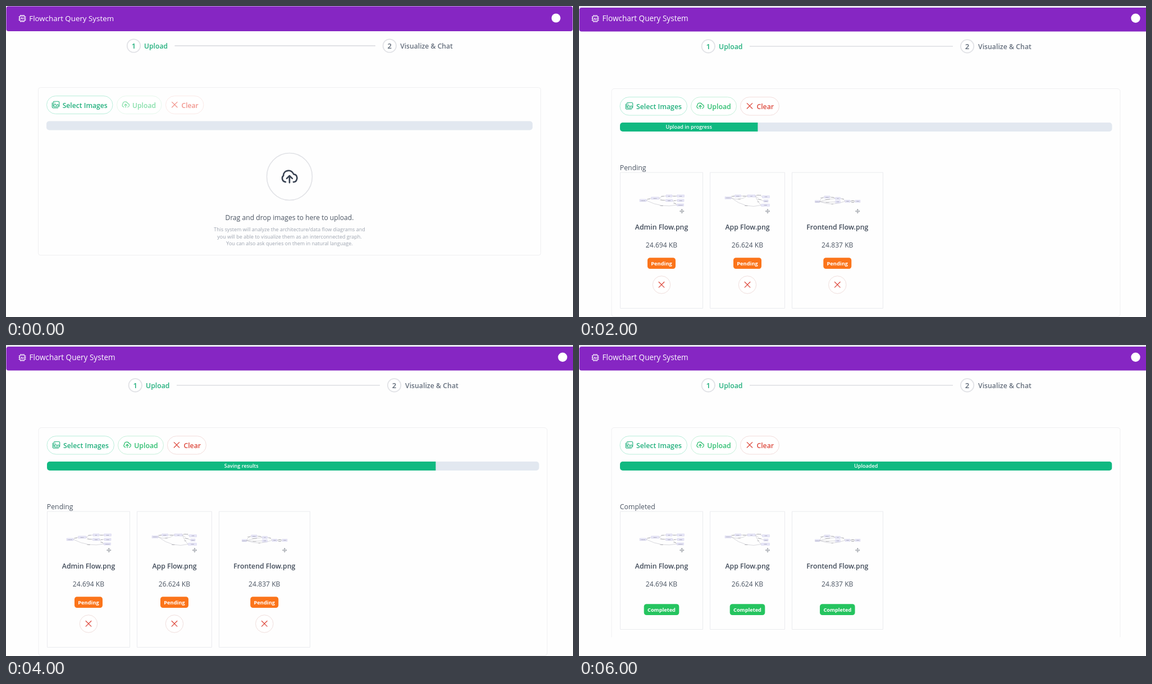
Animation, 1010 px wide and 555 px high, one loop 7 s. Source, as an HTML page with a canvas:

```html
<!DOCTYPE html>
<html lang="en">
<head>
<meta charset="utf-8">
<title>Flowchart Query System</title>
<style>
  html, body { margin: 0; width: 100%; height: 100%; overflow: hidden; background: #fefefe; }
  canvas, svg { position: absolute; left: 0; top: 0; width: 1010px; height: 555px; }
  text { font-family: "Open Sans", "Noto Sans", sans-serif; white-space: pre; }
</style>
</head>
<body>
<canvas id="shapes"></canvas>
<svg id="labels" viewBox="0 0 1010 555"></svg>
<script>
const W = 1010, H = 555, STEP = 1000;
const canvas = document.getElementById('shapes');
const labels = document.getElementById('labels');
const ctx = canvas.getContext('2d');
const dpr = window.devicePixelRatio || 1;
canvas.width = W * dpr;
canvas.height = H * dpr;

const GREEN = '#10b981', RED = '#dd4a3e', SLATE = '#4b5563', RULE = '#e1e2e6';

// Upload stages after the empty start screen: filled share and caption
const stages = [
  [0.25, 'Image(s) ready for upload'],
  [0.28, 'Upload in progress'],
  [0.53, 'Analyzing image(s)'],
  [0.79, 'Saving results'],
  [0.933, 'Merging results from all images'],
  [1, 'Uploaded']
];

// Nodes: x, y, width. Edges: from, to, bend.
const cards = [
  { left: 73.5, right: 220.5, mid: 147, name: 'Admin Flow.png', size: '24.694 KB', grip: 183.3,
    nodes: [[114, 347, 12], [135.5, 343, 14], [160.5, 339, 11], [181, 339, 13],
            [160.5, 347, 12], [181, 347, 12], [180.5, 355, 12]],
    edges: [[0, 1, -2], [1, 2, -3], [1, 4, 3], [2, 3, 0], [4, 5, 0], [4, 6, 2], [0, 6, 10]] },
  { left: 233.5, right: 366.5, mid: 300, name: 'App Flow.png', size: '26.624 KB', grip: 336,
    nodes: [[265.5, 342.5, 11], [283, 339, 11], [307, 339, 14], [333, 340.5, 13],
            [333, 348, 8], [332, 355.5, 15]],
    edges: [[0, 1, -3], [1, 2, 0], [2, 3, -4], [2, 4, 3], [2, 5, 4], [0, 2, 8], [0, 5, 14]] },
  { left: 379.5, right: 541.5, mid: 460.3, name: 'Frontend Flow.png', size: '24.837 KB', grip: 496.3,
    nodes: [[424.5, 349, 8], [442, 341, 10], [461, 343.5, 9], [461, 349.5, 9],
            [478.5, 348.5, 9], [496.5, 348.5, 9]],
    edges: [[0, 1, -5], [1, 2, -2], [0, 2, -2], [0, 3, 2], [0, 4, 9], [2, 4, -4],
            [4, 5, -3], [4, 5, 3]] }
];
const words = ['login', 'view', 'submit', 'open', 'list', 'edit'];

function box(x1, y1, x2, y2, r, fill, stroke, width = 1) {
  ctx.beginPath();
  ctx.roundRect(x1, y1, x2 - x1, y2 - y1, r);
  if (fill) { ctx.fillStyle = fill; ctx.fill(); }
  if (stroke) { ctx.strokeStyle = stroke; ctx.lineWidth = width; ctx.stroke(); }
}

function oval(x, y, rx, ry, fill, stroke, width = 1) {
  ctx.beginPath();
  ctx.ellipse(x, y, rx, ry, 0, 0, Math.PI * 2);
  if (fill) { ctx.fillStyle = fill; ctx.fill(); }
  if (stroke) { ctx.strokeStyle = stroke; ctx.lineWidth = width; ctx.stroke(); }
}

function path(d, x, y, scale, color, width) {
  ctx.save();
  ctx.translate(x, y);
  ctx.scale(scale, scale);
  ctx.strokeStyle = color;
  ctx.lineWidth = width / scale;
  ctx.lineCap = ctx.lineJoin = 'round';
  ctx.stroke(new Path2D(d));
  ctx.restore();
}

function text(str, x, y, size, color, weight = 400, anchor = 'start') {
  const el = document.createElementNS('http://www.w3.org/2000/svg', 'text');
  const attrs = { x, y, fill: color, 'font-size': size, 'font-weight': weight, 'text-anchor': anchor };
  for (const key in attrs) el.setAttribute(key, attrs[key]);
  el.textContent = str;
  labels.append(el);
}
const centered = (str, x, y, size, color, weight) => text(str, x, y, size, color, weight, 'middle');

function cloud(x, y, scale, color, width) {
  path('M-7 9.3C-13.5 8-14.5 1-10.8-2C-11-13 4.5-14 7.3-4.6C12.8-4.6 14.4 1 12.8 5C11.8 8 10 9.3 7 9.3' +
       'M0 10.5V-1.5M-5 3L0-2L5 3', x, y, scale, color, width);
}
const cross = (x, y, r, color) => path('M-1-1L1 1M1-1L-1 1', x, y, r, color, 1.3);

function pictures(x, y, color) {
  path('M-2.6-6H4.6Q6.2-6 6.2-4.4V2Q6.2 3.6 4.6 3.6H-2.6Q-4.2 3.6-4.2 2V-4.4Q-4.2-6-2.6-6Z' +
       'M-4 2L-1-1L1.5 1.4L3.5-.4L6 2M-6.2-3.5V3.6Q-6.2 5.8-4 5.8H4', x, y, 1, color, 1.15);
  oval(-1.6 + x, y - 3.2, 0.8, 0.8, color);
}

function chip(x, y) {
  box(x - 4.5, y - 4.5, x + 4.5, y + 4.5, 1, null, '#fff', 1.2);
  let pins = '';
  for (const p of [-2.7, 0, 2.7]) {
    pins += `M${p}-6.2V-4.5M${p} 4.5V6.2M-6.2 ${p}H-4.5M4.5 ${p}H6.2`;
  }
  path(pins, x, y, 1, '#fff', 1.1);
  centered('AI', x, y + 2.2, 6, '#fff', 700);
}

function step(x, y, num, color) {
  oval(x, y, 11.7, 11.7, '#fff', RULE, 1.8);
  centered(num, x, y + 5, 13.2, color, 600);
}

function header(first) {
  if (first) {
    box(0.5, 0.5, 1009.5, 45, 4, '#8626c3');
  } else {
    box(0, 0, W, 3, 0, '#e9e7f1');
    box(0.5, 3, 1016, 45.5, 4, '#8626c3');
  }
  const y = first ? 22.2 : 22.5;
  chip(29, y);
  text('Flowchart Query System', first ? 41.3 : 41.6, y + 4.7, first ? 13.35 : 13.55, '#fff');
  if (first) oval(979.7, 21.5, 8, 8, '#fff');
  else oval(991.5, 21.8, 8.2, 8.2, '#fff');
}

function stepper(first) {
  const y = first ? 71 : 71.8, size = first ? 12.15 : 12.3;
  step(first ? 227.5 : 230.3, y, '1', '#22b07d');
  step(first ? 683.3 : 691.6, y, '2', '#5b6674');
  box(first ? 300.5 : 304, y - 0.9, first ? 658 : 666, y + 0.9, 0, RULE);
  text('Upload', first ? 246 : 249, y + 5.3, size, '#22b07d', 600);
  text('Visualize & Chat', first ? 702.2 : 711, y + 5.3, size, '#66707e', 600);
}

function buttons(first) {
  const top = first ? 160.5 : 162.5, bottom = first ? 192.5 : 195;
  const y = (top + bottom) / 2, base = y + 5, size = first ? 12.15 : 12.3;
  const pill = (a, b, edge) => box(a, top, b, bottom, 16.2, '#fff', edge);
  const up = first ? '#86dfaa' : '#2fbf71', clear = first ? '#f1958d' : RED;

  pill(first ? 72.5 : 73, first ? 190 : 192.5, '#b9eedb');
  pictures(first ? 88.5 : 89.5, y - 0.3, '#22b07d');
  text('Select Images', first ? 100.7 : 102, base, size, '#22b07d', 600);

  pill(first ? 197.5 : 199.5, first ? 277 : 280.5, first ? '#e6f8ec' : '#c6f0da');
  cloud(first ? 213.2 : 216, y - 0.5, 0.47, up, 1.3);
  text('Upload', first ? 225 : 228.2, base, size, up, 600);

  pill(first ? 284.5 : 287.5, first ? 352 : 356.5, first ? '#fbe9e7' : '#f3dddb');
  cross(first ? 300.3 : 304, y - 0.4, 4.7, clear);
  text('Clear', first ? 312.5 : 316.4, base, size, clear, 600);
}

function progress(first, share, caption) {
  const left = first ? 72 : 73, right = first ? 938 : 949.5;
  const top = first ? 205.5 : 208, bottom = first ? 221.5 : 224;
  box(left, top, right, bottom, 5, '#e2e8f0');
  if (!share) return;
  const end = left + (right - left) * share;
  ctx.save();
  ctx.clip();
  box(left, top, end, bottom, 0, GREEN);
  ctx.restore();
  centered(caption, (left + end) / 2, 219.3, 9.13, '#fff', 600);
}

function dropZone() {
  oval(505, 304.5, 40.5, 42, '#fefefe', RULE, 1.6);
  cloud(505, 304.8, 1, '#374151', 2.6);
  centered('Drag and drop images to here to upload.', 505, 381.5, 12.1, SLATE);
  [
    'This system will analyze the architecture/data flow diagrams and',
    'you will be able to visualize them as an interconnected graph.',
    'You can also ask queries on them in natural language.'
  ].forEach((line, i) => centered(line, 505, 401.8 + i * 12.75, 9, '#9ca3af'));
}

function diagram(card) {
  ctx.strokeStyle = '#a9a9b4';
  ctx.lineWidth = 0.45;
  card.edges.forEach(([from, to, bend], i) => {
    const a = card.nodes[from], b = card.nodes[to];
    const x1 = a[0] + a[2] / 2, x2 = b[0] - b[2] / 2;
    const mx = (x1 + x2) / 2, my = (a[1] + b[1]) / 2 + bend;
    ctx.beginPath();
    ctx.moveTo(x1, a[1]);
    ctx.quadraticCurveTo(mx, my, x2, b[1]);
    ctx.stroke();
    centered(words[i % words.length], mx, my - bend / 2 + 0.7, 2.5, '#4a4a52');
  });
  card.nodes.forEach(([x, y, w], i) => {
    box(x - w / 2, y - 2.1, x + w / 2, y + 2.1, 0.3, '#e6e5f7', '#cbc8e6', 0.4);
    centered(words[(i + 2) % words.length], x, y + 0.8, 2.5, '#4a4a5e');
  });
  path('M-3.4 0H3.4M0-3.4V3.4M-1.1-2.4L0-3.5L1.1-2.4M-1.1 2.4L0 3.5L1.1 2.4' +
       'M-2.4-1.1L-3.5 0L-2.4 1.1M2.4-1.1L3.5 0L2.4 1.1', card.grip, 366.2, 1, '#858992', 0.8);
}

function cardView(card, done) {
  const x = card.mid;
  box(card.left, 297, card.right, done ? 507.5 : 539.5, 0, '#fefefe', '#eaebee');
  diagram(card);
  centered(card.name, x, 398.5, 12.3, '#424c5a', 600);
  centered(card.size, x, 430.5, 12.15, SLATE);
  if (done) {
    box(x - 31.3, 462.3, x + 31.3, 482, 4.5, '#25c45f');
    centered('Completed', x, 475.7, 9.2, '#fff', 700);
  } else {
    box(x - 25, 449.3, x + 25, 469, 4.5, '#fb741a');
    centered('Pending', x, 462.6, 9.3, '#fff', 700);
    oval(x, 497.5, 15.7, 15.7, '#fff', '#f0dedc');
    cross(x, 497.3, 4.8, RED);
  }
}

function panel(first, done) {
  const edge = '#efeff1';
  if (first) box(57.5, 145.5, 952.5, 444.8, 4, '#fefefe', edge);
  else if (!done) box(58, 147.5, 964, 554.5, 5, '#fefefe', edge);
  else path('M58 521V152.5Q58 147.5 63 147.5H959Q964 147.5 964 152.5V521', 0, 0, 1, edge, 1);
}

function draw(index) {
  const first = index === 0, done = index === stages.length;
  const [share, caption] = first ? [0, ''] : stages[index - 1];
  labels.replaceChildren();
  ctx.setTransform(dpr, 0, 0, dpr, 0, 0);
  ctx.fillStyle = '#fefefe';
  ctx.fillRect(0, 0, W, H);
  header(first);
  stepper(first);
  panel(first, done);
  buttons(first);
  progress(first, share, caption);
  if (first) {
    dropZone();
  } else {
    text(done ? 'Completed' : 'Pending', 72.8, 292.8, 12.3, SLATE);
    cards.forEach(card => cardView(card, done));
  }
}

const start = performance.now();
let shown = -1;
function tick() {
  const elapsed = Math.max(0, performance.now() - start);
  const index = Math.floor(elapsed / STEP) % (stages.length + 1);
  if (index !== shown) draw(shown = index);
  requestAnimationFrame(tick);
}
tick();
</script>
</body>
</html>
```
